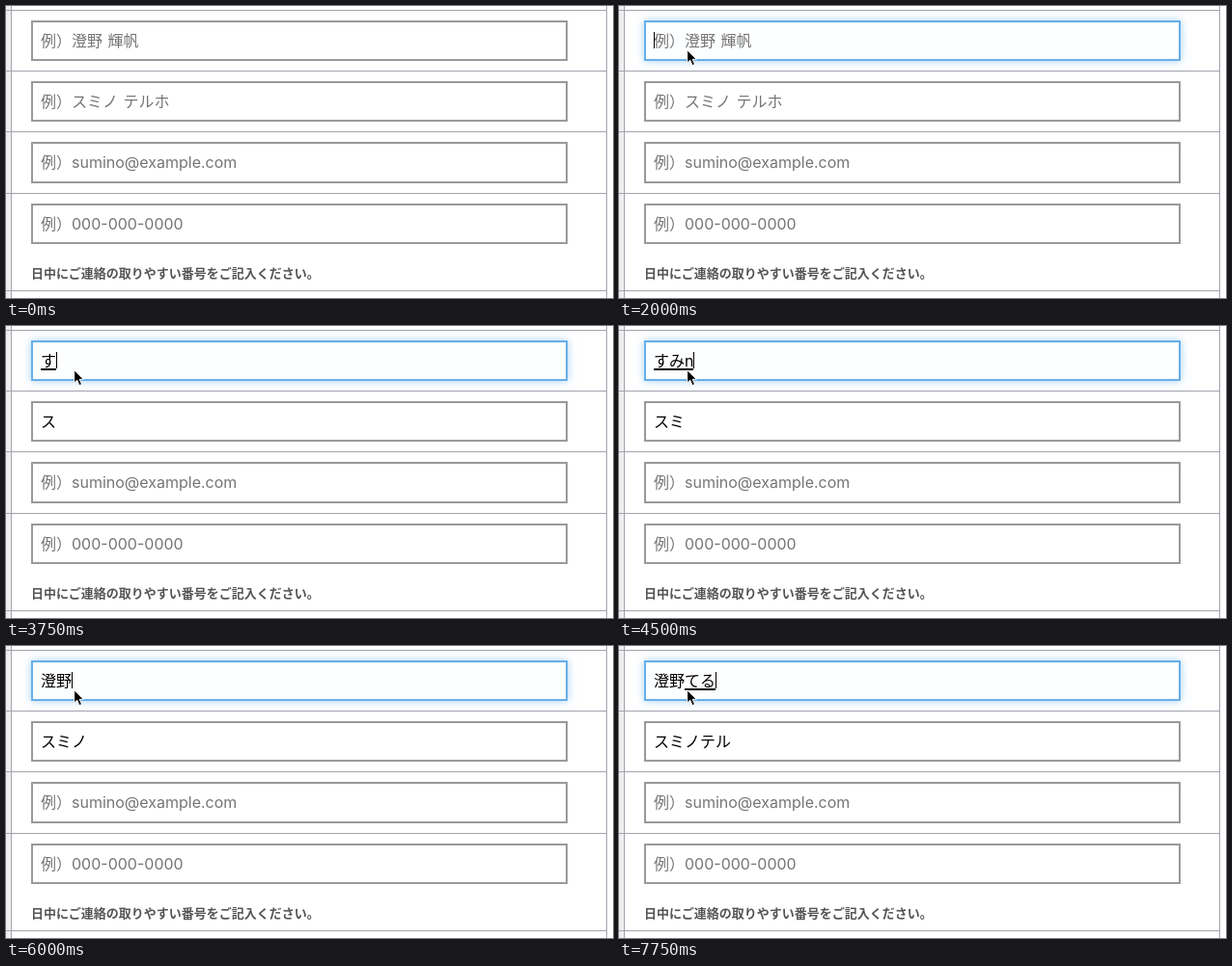
Write an HTML page that moves like this. It is 629 px wide and 303 px high and loops after 8000 ms.

```html
<!DOCTYPE html>
<html lang="ja">
<meta charset="utf-8">
<title>Name form</title>
<style>
  html, body { margin: 0; width: 100%; height: 100%; overflow: hidden; background: #fff; }
  body { position: relative; font: 16px Inter, "Noto Sans CJK JP", sans-serif; color: #000; }
  body * { position: absolute; box-sizing: border-box; white-space: pre; }
  .side { left: 0; top: 0; width: 6px; height: 303px; background: #eee; border-right: 1px solid #a3a3ae; }
  .edge { left: 622px; top: 0; width: 1px; height: 303px; background: #a3a3ae; }
  .rule { left: 0; width: 622px; height: 1px; background: #a3a3ae; }
  .field { left: 26px; width: 556px; height: 42px; border: 2px solid #999; background: #fff; line-height: 38px; }
  .field.focus { border-color: #66afe9; background: #fcfeff; box-shadow: 0 0 8px rgba(102, 175, 233, .6); }
  .field span { left: 8px; top: 0; }
  .field span * { position: static; }
  .hint { color: #757575; word-spacing: 1px; }
  .field u { text-decoration: none; display: inline-block; height: 19px; line-height: 19px; border-bottom: 2px solid #000; }
  .field .caret { position: relative; display: inline-block; width: 1px; height: 17px; margin-right: -1px; background: #000; vertical-align: -2px; }
  .note { left: 26px; top: 267px; font: 700 13px/20px "Noto Sans CJK JP", sans-serif; color: #555; }
  #pointer { left: 0; top: 0; width: 14px; height: 20px; overflow: visible; }
</style>
<body>
<div class="side"></div>
<div class="edge"></div>
<div class="note">日中にご連絡の取りやすい番号をご記入ください。</div>
<svg id="pointer"><path d="M.7 .7V14L3.7 11.2L6 16.6L8.5 15.5L6.2 10.3H10.3Z" stroke="#fff"/></svg>
<script>
const LOOP = 8000;
const pointer = document.getElementById('pointer');
const hints = ['澄野 輝帆', 'スミノ テルホ', 'sumino@example.com', '000-000-0000'];

function add(className, top) {
  const el = document.createElement('div');
  el.className = className;
  el.style.top = top + 'px';
  document.body.insertBefore(el, pointer);
  return el;
}

[4, 67, 130, 194, 295].forEach(y => add('rule', y));
const fields = [15, 78, 141, 205].map(y => add('field', y));
fields[2].style.height = '43px';

// [start, x, y]
const moves = [[0, -50, 0], [500, 100, 9], [750, 81, 36], [1000, 72, 46], [1250, 70, 45]];

// [start, committed, composing, reading, caret shown]
const typing = [
  [0, '', '', '', 0],
  [2000, '', '', '', 1],
  [2500, '', '', '', 0],
  [3000, '', '', '', 1],
  [3750, '', 'す', 'ス', 1],
  [4000, '', 'すm', 'ス', 1],
  [4250, '', 'すみ', 'スミ', 1],
  [4500, '', 'すみn', 'スミ', 1],
  [4750, '', 'すみの', 'スミノ', 1],
  [5250, '', '澄野', 'スミノ', 1],
  [5750, '', '澄野', 'スミノ', 0],
  [6000, '澄野', '', 'スミノ', 1],
  [6500, '澄野', '', 'スミノ', 0],
  [6750, '澄野', 't', 'スミノ', 1],
  [7250, '澄野', 'てr', 'スミノテ', 1],
  [7750, '澄野', 'てる', 'スミノテル', 1],
];

const at = (steps, t) => steps.findLast(step => step[0] <= t);

function fill(i, content, caret = '') {
  const hint = content ? '' : `<span class="hint">例）${hints[i]}</span>`;
  fields[i].innerHTML = `${hint}<span>${content}${caret}</span>`;
}

fill(2, '');
fill(3, '');

let shown;
function draw() {
  const t = performance.now() % LOOP;
  const [, x, y] = at(moves, t);
  pointer.style.transform = `translate(${x}px, ${y}px)`;

  const state = at(typing, t);
  if (state !== shown) {
    const [, committed, composing, reading, caret] = shown = state;
    fields[0].classList.toggle('focus', t >= 2000);
    fill(0, committed + (composing && `<u>${composing}</u>`), caret ? '<i class="caret"></i>' : '');
    fill(1, reading);
  }
  requestAnimationFrame(draw);
}
draw();
</script>
</body>
</html>
```
